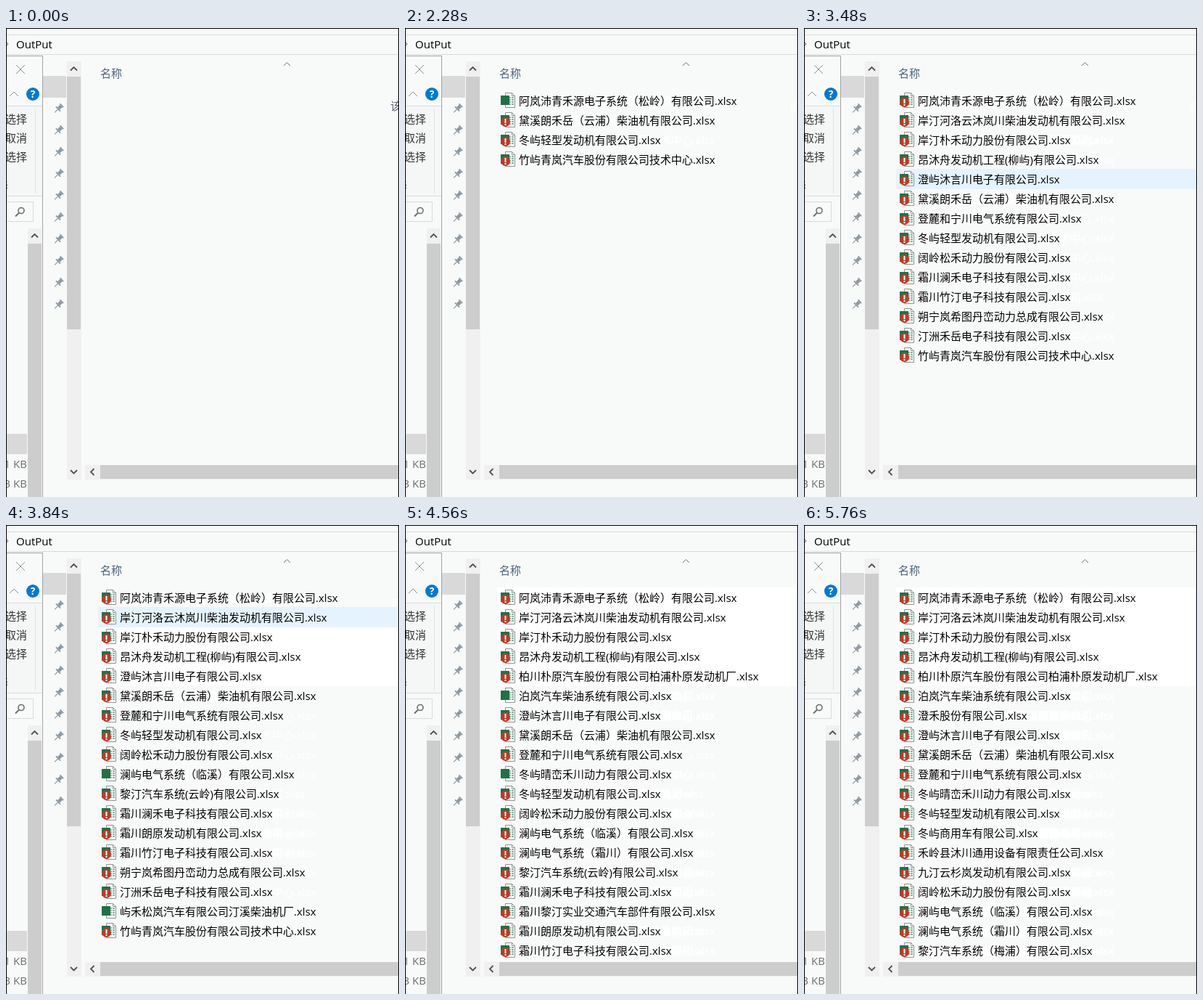
These frames come from a looping animation (542x646 px, 5.88 s). An HTML page with a canvas:

```html
<!DOCTYPE html>
<html lang="zh-CN">
<head>
<meta charset="utf-8">
<style>
html, body { margin: 0; width: 542px; height: 646px; overflow: hidden; background: #f8faf9; }
canvas { display: block; }
</style>
</head>
<body>
<canvas id="stage" width="542" height="646"></canvas>
<script>
const ctx = document.getElementById('stage').getContext('2d');
const LOOP = 5880, BG = '#f8faf9', ROW = 27, FIRST = 100, VISIBLE = 19;
const FONT = '"Open Sans", "Noto Sans CJK SC", "Noto Sans CJK", sans-serif';

// Sorted listing: name, time it appears, time its status badge appears
const files = [
  ['阿岚沛青禾源电子系统（松岭）有限公司', 2220, 2340],
  ['岸汀河洛云沐岚川柴油发动机有限公司', 2340, 2400],
  ['岸汀朴禾动力股份有限公司', 2700, 2760],
  ['昂沐舟发动机工程(柳屿)有限公司', 2580, 2760],
  ['柏川朴原汽车股份有限公司柏浦朴原发动机厂', 4080, 4200],
  ['泊岚汽车柴油系统有限公司', 4560, 4680],
  ['澄禾股份有限公司', 5640, 5760],
  ['澄屿沐言川电子有限公司', 2520, 2580],
  ['黛溪朗禾岳（云浦）柴油机有限公司', 2160, 2220],
  ['登麓和宁川电气系统有限公司', 2400, 2520],
  ['冬屿晴峦禾川动力有限公司', 4440, 4680],
  ['冬屿轻型发动机有限公司', 2040, 2160],
  ['冬屿商用车有限公司', 5400, 5520],
  ['禾岭县沐川通用设备有限责任公司', 5520, 5580],
  ['九汀云杉岚发动机有限公司', 4920, 5400],
  ['阔岭松禾动力股份有限公司', 2940, 3000],
  ['澜屿电气系统（临溪）有限公司', 3840, 3900],
  ['澜屿电气系统（霜川）有限公司', 3900, 3960],
  ['黎汀汽车系统（梅浦）有限公司', 5580, 5640],
  ['黎汀汽车系统(云岭)有限公司', 3660, 3840],
  ['霜川澜禾电子科技有限公司', 3060, 3180],
  ['霜川黎汀实业交通汽车部件有限公司', 4200, 4320],
  ['霜川朗原发动机有限公司', 3540, 3660],
  ['霜川竹汀电子科技有限公司', 3420, 3480],
  ['朔宁岚希图丹峦动力总成有限公司', 3060, 3180],
  ['汀洲禾岳电子科技有限公司', 3360, 3420],
  ['屿禾松岚汽车有限公司汀溪柴油机厂', 3840, 3900],
  ['竹屿青岚汽车股份有限公司技术中心', 1560, 1800],
].map(([name, added, badged]) => ({ name: name + '.xlsx', added, badged }));

// Pointer passing up the list: row, time
const hovers = [[4, 3480], [3, 3540], [2, 3660], [1, 3840], [0, 3960], [-1, 4080]];

const times = [...new Set([0, ...files.flatMap(f => [f.added, f.badged]), ...hovers.map(h => h[1])])]
  .sort((a, b) => a - b);
const addTimes = [...new Set(files.map(f => f.added))].sort((a, b) => a - b);

function rect(x, y, w, h, color) {
  ctx.fillStyle = color;
  ctx.fillRect(x, y, w, h);
}
function frame(x, y, w, h, color) {
  ctx.strokeStyle = color;
  ctx.lineWidth = 1;
  ctx.strokeRect(x + .5, y + .5, w - 1, h - 1);
}
function line(points, color, width = 1) {
  ctx.beginPath();
  points.forEach(([x, y]) => ctx.lineTo(x, y));
  ctx.strokeStyle = color;
  ctx.lineWidth = width;
  ctx.stroke();
}
function circle(x, y, r, color) {
  ctx.beginPath();
  ctx.arc(x, y, r, 0, 7);
  ctx.fillStyle = color;
  ctx.fill();
}
function text(str, x, y, color, align = 'left', size = 15, weight = '') {
  ctx.font = `${weight} ${size}px ${FONT}`;
  ctx.textAlign = align;
  ctx.fillStyle = color;
  ctx.fillText(str, x, y);
}
function chevron(x, y, w, h, color, width) {
  line([[x - w, y + h], [x, y], [x + w, y + h]], color, width);
}

function pin(x, y) {
  const color = '#8b98a1';
  ctx.save();
  ctx.translate(x, y);
  ctx.rotate(Math.PI / 4);
  rect(-3.3, -7, 6.6, 1.8, color);
  rect(-2.3, -5.2, 4.6, 5, color);
  rect(-4.3, -.2, 8.6, 1.8, color);
  rect(-.6, 1.6, 1.2, 6, color);
  ctx.restore();
}

function sheetIcon(y, badged) {
  ctx.beginPath();
  [[138.5, 89.5], [147.5, 89.5], [151.5, 93.5], [151.5, 109.5], [138.5, 109.5]]
    .forEach(([px, py]) => ctx.lineTo(px, py - FIRST + y));
  ctx.closePath();
  ctx.fillStyle = '#fff';
  ctx.fill();
  ctx.strokeStyle = '#8f9391';
  ctx.lineWidth = 1;
  ctx.stroke();
  line([[147.5, y - 10.5], [147.5, y - 6.5], [151.5, y - 6.5]], '#8f9391');
  for (let i = 0; i < 4; i++) {
    rect(143, y - 5 + i * 3, 3, 2, '#86b59a');
    rect(147, y - 5 + i * 3, 3, 2, '#86b59a');
  }
  rect(132, y - 7, 12, 13, '#1f7246');
  if (badged) {
    circle(138.5, y + 2.5, 6.5, '#bf3a26');
    rect(137.5, y - 2, 2, 6, '#fff');
    rect(137.5, y + 5, 2, 2, '#fff');
  }
}

function drawBackWindow() {
  rect(0, 9, 542, 1, '#d9dbda');
  rect(0, 36, 542, 1, '#d9dbda');
  line([[0, 19], [3, 22], [0, 25]], '#555');
  text('OutPut', 14, 28, '#000');

  rect(51, 66, 32, 30, '#d9d9d9');
  for (let i = 0; i < 10; i++) pin(72.5, 111 + i * 30);

  rect(84, 46, 20, 576, '#f0f0f0');
  rect(84, 67, 19, 348, '#cdcdcd');
  chevron(93.5, 54, 4.5, 4.5, '#505050', 1.8);
  chevron(93.5, 613.5, 4.5, -4.5, '#505050', 1.8);

  rect(109, 602, 433, 20, '#f0f0f0');
  rect(130, 602, 412, 19, '#cdcdcd');
  line([[121.5, 607], [117, 611.5], [121.5, 616]], '#505050', 1.8);

  chevron(387.5, 47.5, 4.5, 4.5, '#6d6d6d');
  text('名称', 130, 68, '#4c607a');
}

function drawFrontWindow() {
  rect(0, 38, 51, 608, BG);
  rect(0, 38, 51, 1, '#a0a2a1');
  rect(50, 38, 1, 608, '#a0a2a1');
  line([[14, 51], [26, 63]], '#8c8c8c');
  line([[26, 51], [14, 63]], '#8c8c8c');
  chevron(11, 88, 6, 6, '#8c8c8c');
  circle(37, 91, 9, '#0078d7');
  text('?', 37, 96, '#fff', 'center', 14, 'bold');

  rect(1, 107, 49, 125, '#f5f7f7');
  rect(1, 107, 49, 1, '#dadbdc');
  rect(1, 231, 49, 1, '#dadbdc');
  rect(40, 111, 1, 117, '#e0e2e3');
  ['选择', '取消', '选择'].forEach((s, i) => text(s, 29, 131 + i * 26, '#333', 'right'));
  text('择', 3, 222, '#6d6d6d', 'right', 14);

  frame(-2, 239, 40, 28, '#d9dbda');
  ctx.beginPath();
  ctx.arc(21, 251.5, 4, 0, 7);
  ctx.strokeStyle = '#6d6d6d';
  ctx.lineWidth = 1.6;
  ctx.stroke();
  line([[18, 254.5], [13, 259.5]], '#6d6d6d', 2);

  rect(30, 276, 19, 370, '#f0f0f0');
  rect(30, 297, 19, 349, '#cdcdcd');
  chevron(39.5, 284, 4.5, 4.5, '#505050', 1.8);
  rect(1, 559, 28, 28, '#d9d9d9');
  text('1 KB', 29, 606, '#6d6d6d', 'right');
  text('3 KB', 29, 633, '#6d6d6d', 'right');
}

const listAt = t => files.filter(f => f.added <= t).slice(0, VISIBLE);
const rowY = i => FIRST + i * ROW;
const drawName = (f, i, color) => text(f.name, 157, rowY(i) + 6, color);

function drawList(t) {
  const list = listAt(t);
  text('该', 530, 113, list.length ? '#fff' : '#5f5f78');

  // Rows keep a faint white trace of names that have moved on
  for (const at of addTimes) {
    if (at >= t) break;
    listAt(at).forEach((f, i) => drawName(f, i, '#fff'));
  }
  const passed = hovers.filter(h => h[1] <= t);
  passed.forEach(([row], i) => {
    if (row >= 0) {
      rect(127, rowY(row) - 14, 415, ROW + 1, i === passed.length - 1 ? '#e5f3ff' : '#fff');
    }
  });
  list.forEach((f, i) => {
    sheetIcon(rowY(i), f.badged <= t);
    drawName(f, i, '#000');
  });
}

function draw(t) {
  rect(0, 0, 542, 646, BG);
  drawList(t);
  drawBackWindow();
  drawFrontWindow();
  rect(0, 0, 542, 1, '#000');
  rect(0, 0, 1, 646, '#000');
  rect(541, 0, 1, 646, '#000');
}

let shown = -1;
function tick() {
  const now = performance.now() % LOOP;
  const step = times.filter(t => t <= now).pop();
  if (step !== shown) draw(shown = step);
  requestAnimationFrame(tick);
}
tick();
</script>
</body>
</html>
```
